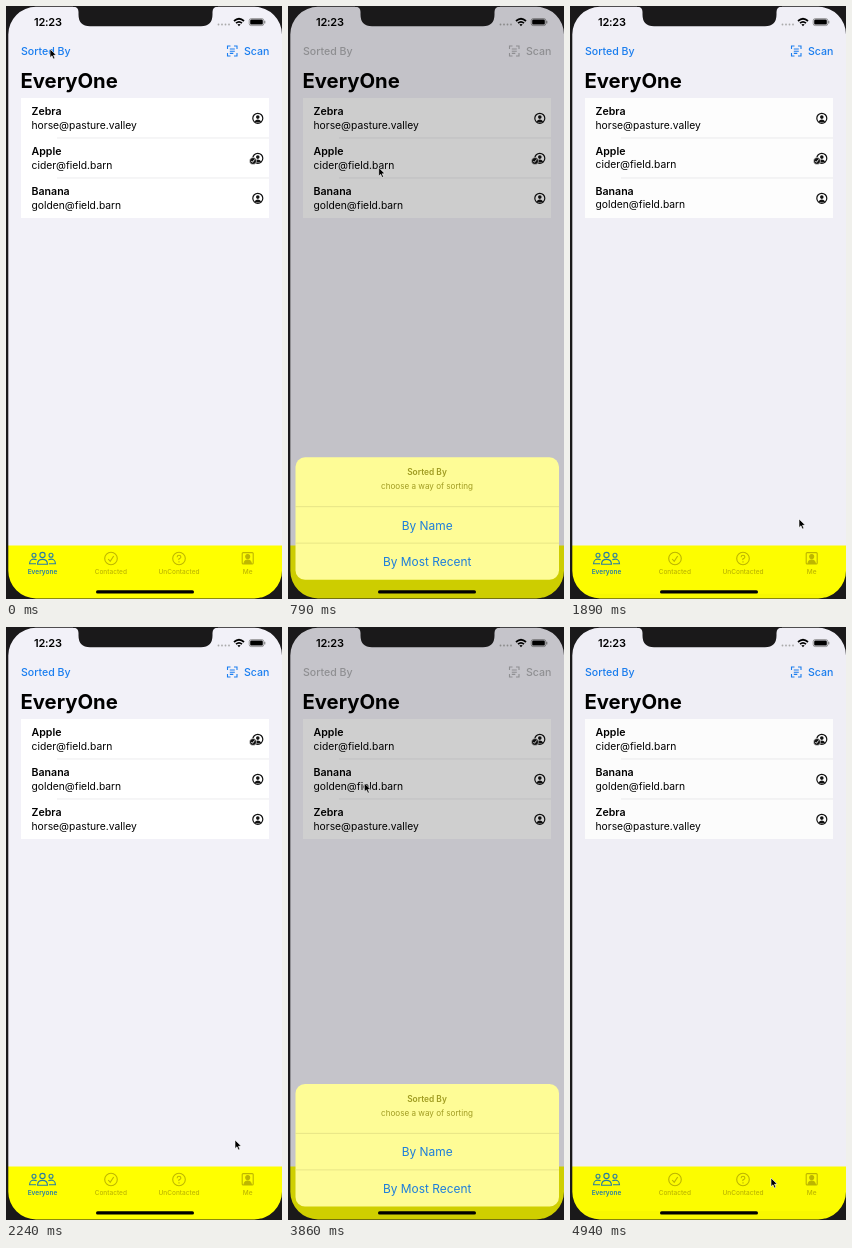
These frames come from a looping animation (276x593 px, 5.14 s). An HTML page:

```html
<!DOCTYPE html>
<html lang="en">
<head>
<meta charset="utf-8">
<title>Sorted list</title>
<style>
html, body { margin: 0; width: 100%; height: 100%; overflow: hidden; background: #1a191a; }
svg { display: block; width: 276px; height: 593px; font: 400 10.3px Inter, "Open Sans", sans-serif; }
.nav { font-size: 10.6px; font-weight: 550; }
.name { font-size: 10.6px; font-weight: 600; }
.tab { font-size: 6.5px; font-weight: 500; text-anchor: middle; stroke: none; fill: currentColor; }
.tabs g { fill: none; stroke: currentColor; stroke-width: 1.1; }
#sheet { text-anchor: middle; }
.choice { font-size: 11.9px; fill: #1d7edb; }
.hint { font-size: 8.1px; fill: #a09c22; }
.bold { font-weight: 600; }
</style>
</head>
<body>
<svg viewBox="0 0 276 593">
  <defs>
    <g id="person" fill="none" stroke="#111">
      <circle r="5" stroke-width="1.2"/>
      <circle cy="-1.2" r="1.8" fill="#111" stroke="none"/>
      <path d="M-3.5 3.2Q0-.9 3.5 3.2Q0 5.4-3.5 3.2" fill="#111" stroke="none"/>
    </g>
  </defs>

  <rect width="276" height="593" fill="#f2f1f8"/>
  <text class="bold" x="28" y="20" font-size="11" letter-spacing="-.02em">12:23</text>
  <g fill="#aaa"><circle cx="212.5" cy="18.5" r=".9"/><circle cx="216" cy="18.5" r=".9"/><circle cx="219.5" cy="18.5" r=".9"/><circle cx="223" cy="18.5" r=".9"/></g>
  <g fill="none" stroke="#000" stroke-width="1.7">
    <path d="M228 15Q233 10.5 238 15M230 17.2Q233 14.6 236 17.2"/>
    <path d="M231.4 18.4L233 20.2L234.6 18.4Q233 17.4 231.4 18.4" fill="#000" stroke="none"/>
  </g>
  <rect x="243.2" y="12.6" width="14.6" height="7" rx="2" fill="none" stroke="#777" stroke-width=".7"/>
  <rect x="244.2" y="13.6" width="12.6" height="5" rx="1.2"/>
  <path d="M258.8 14.8v2.6" stroke="#777"/>

  <g id="nav" class="nav" fill="currentColor">
    <text id="sort" x="15" y="48.8">Sorted By</text>
    <text x="238" y="48.8">Scan</text>
    <path d="M221.5 43v-3h3M228 40h3v3M231 47v3h-3M224.5 50h-3v-3M223.8 43h5M223.8 45.2h5M223.8 47.4h3.5" fill="none" stroke="currentColor" stroke-width="1.1"/>
  </g>
  <text x="14.5" y="82" font-size="20.3" font-weight="700">EveryOne</text>

  <rect x="15" y="92" width="248" height="120" fill="#fff"/>
  <g id="rows"></g>
  <path d="M51 132h212M51 172h212" stroke="#e0e0e3" stroke-width=".6"/>

  <rect y="539.5" width="276" height="54" fill="#ff0"/>
  <g class="tabs">
    <g id="active">
      <circle cx="36.5" cy="549" r="2.6"/><path d="M31.5 558.3Q31.7 553.4 36.5 553.4T41.5 558.3Z"/>
      <circle cx="28" cy="549.3" r="2"/><path d="M30.7 553.7Q24 551.5 23.5 557.8H30"/>
      <circle cx="45" cy="549.3" r="2"/><path d="M42.3 553.7Q49 551.5 49.5 557.8H43"/>
      <text class="tab bold" x="36.5" y="568.3">Everyone</text>
    </g>
    <g id="idle">
      <circle cx="105" cy="552.5" r="6.3"/><path d="M102.2 553l2 2.3l3.5-5.3"/>
      <text class="tab" x="104.8" y="568.3">Contacted</text>
      <circle cx="173" cy="552.5" r="6.3"/>
      <path d="M171.1 551.2Q171.2 549.3 173 549.3T174.9 551Q174.8 552.2 173.6 552.6T173 554.1M173 555.2v1.2"/>
      <text class="tab" x="173" y="568.3">UnContacted</text>
      <rect x="236.2" y="546.6" width="11" height="11.4" rx="1"/>
      <circle cx="241.7" cy="550.6" r="2" fill="currentColor"/>
      <path d="M238 557.5Q238.5 554 241.7 554T245.4 557.5Z" fill="currentColor"/>
      <text class="tab" x="241.7" y="568.3">Me</text>
    </g>
  </g>

  <rect id="dim" width="276" height="593"/>
  <g id="sheet">
    <rect id="panel" x="7.5" y="448.5" width="263.5" height="122.5" rx="9.5"/>
    <path d="M7.5 497.8h263.5M7.5 534.3h263.5" stroke="#dedb80" stroke-width=".7"/>
    <text class="hint bold" x="139" y="466" style="font-size:8.4px">Sorted By</text>
    <text class="hint" x="139" y="480">choose a way of sorting</text>
    <text class="choice" x="139.2" y="520.7">By Name</text>
    <text class="choice" x="139.2" y="557.2">By Most Recent</text>
  </g>
  <rect x="90" y="584.3" width="98" height="3.2" rx="1.6"/>

  <path fill="#1a191a" fill-rule="evenodd" d="M0 0H276V593H0ZM30 .8A27.7 27.7 0 0 0 2.3 28.5V564.7A27.7 27.7 0 0 0 30 592.4H248.3A27.7 27.7 0 0 0 276 564.7V28.5A27.7 27.7 0 0 0 248.3 .8Z"/>
  <path fill="#1a191a" d="M67 0V.8Q72.5 .8 72.5 6V8.5Q72.5 20.2 84 20.2H195Q206.5 20.2 206.5 8.5V6Q206.5 .8 212 .8V0Z"/>
  <path id="cursor" d="M0 0V8.6L2 6.8L3.4 10L4.9 9.3L3.5 6.3L6.2 6.1Z" stroke="#fff" stroke-width=".6"/>
</svg>
<script>
const LOOP = 5140, SPEED = .017;
const $ = id => document.getElementById(id);
const clamp = v => Math.max(0, Math.min(1, v));
const mix = (a, b, k) => a + (b - a) * k;
const blend = (a, b, k) => `rgb(${a.map((v, i) => Math.round(mix(v, b[i], k)))})`;
const ramp = (t, from, to) => clamp((t - from) / (to - from));
const ease = k => k * k * (3 - 2 * k);

// Critically damped spring from 0 to 1
const spring = (t, start, speed = SPEED) => {
  const x = Math.max(0, t - start) * speed;
  return 1 - (1 + x) * Math.exp(-x);
};

const SHOWS = [[447, 1640], [3594, 4720]];
const REORDER = [1890, 2180];
const BLUE = [26, 126, 240], GRAY = [176, 176, 180];

const people = [
  { name: 'Zebra', mail: 'horse@pasture.valley', from: 0, to: 2 },
  { name: 'Apple', mail: 'cider@field.barn', from: 1, to: 0, done: true },
  { name: 'Banana', mail: 'golden@field.barn', from: 2, to: 1 }
];

const badge = `<circle cx="247" cy="115" r="3.5" fill="#111" stroke="#fff" stroke-width=".6"/>
  <path d="M245.4 115l1.1 1.3l2-2.8" fill="none" stroke="#fff" stroke-width=".9"/>`;
$('rows').innerHTML = people.map(p => `<g>
  <rect x="15" y="92" width="248" height="40" fill="#fff"/>
  <text class="name" x="25.5" y="109.3">${p.name}</text>
  <text x="25.5" y="122.5">${p.mail}</text>
  <use href="#person" x="251.8" y="112.3"/>${p.done ? badge : ''}</g>`).join('');
const rows = [...$('rows').children];

// Pointer stops: time, x, y
const stops = [
  [0, 44, 43], [640, 44, 43], [1090, 222, 495], [1290, 229, 513], [2640, 229, 513],
  [3140, 44, 43], [3190, 44, 43], [3440, 44, 54], [3740, 44, 54], [4140, 192, 520],
  [4290, 201, 547], [4640, 201, 547], [4790, 201, 551], [LOOP, 201, 551]
];

function pointer(t) {
  const i = stops.findIndex(s => s[0] > t);
  const [t0, x0, y0] = stops[i - 1], [t1, x1, y1] = stops[i];
  const k = ease(ramp(t, t0, t1));
  return [mix(x0, x1, k), mix(y0, y1, k)];
}

const move = (el, x, y) => el.setAttribute('transform', `translate(${x} ${y})`);

function draw() {
  const t = performance.now() % LOOP;
  let shown = 0, press = 0;
  for (const [open, close] of SHOWS) {
    shown += spring(t, open) * (1 - spring(t, close, .02));
    press += ramp(t, open - 150, open - 102) * (1 - ramp(t, open + 50, open + 98));
  }
  shown = clamp(shown);
  const tint = clamp((shown - .08) * 8);

  $('nav').style.color = blend(BLUE, GRAY, tint);
  $('sort').style.opacity = 1 - .55 * press;
  $('active').style.color = blend([40, 125, 165], [160, 155, 0], tint);
  $('idle').style.color = blend([190, 183, 0], [165, 160, 0], tint);
  $('dim').style.opacity = .2 * shown;
  $('panel').style.fill = blend([248, 248, 0], [254, 252, 150], clamp((shown - .18) * 4));
  $('sheet').style.display = shown < .005 ? 'none' : '';
  move($('sheet'), 0, 145 * (1 - shown));

  const k = ease(ramp(t, ...REORDER));
  people.forEach((p, i) => move(rows[i], 0, 40 * mix(p.from, p.to, k)));
  move($('cursor'), ...pointer(t));
  requestAnimationFrame(draw);
}
draw();
</script>
</body>
</html>
```
